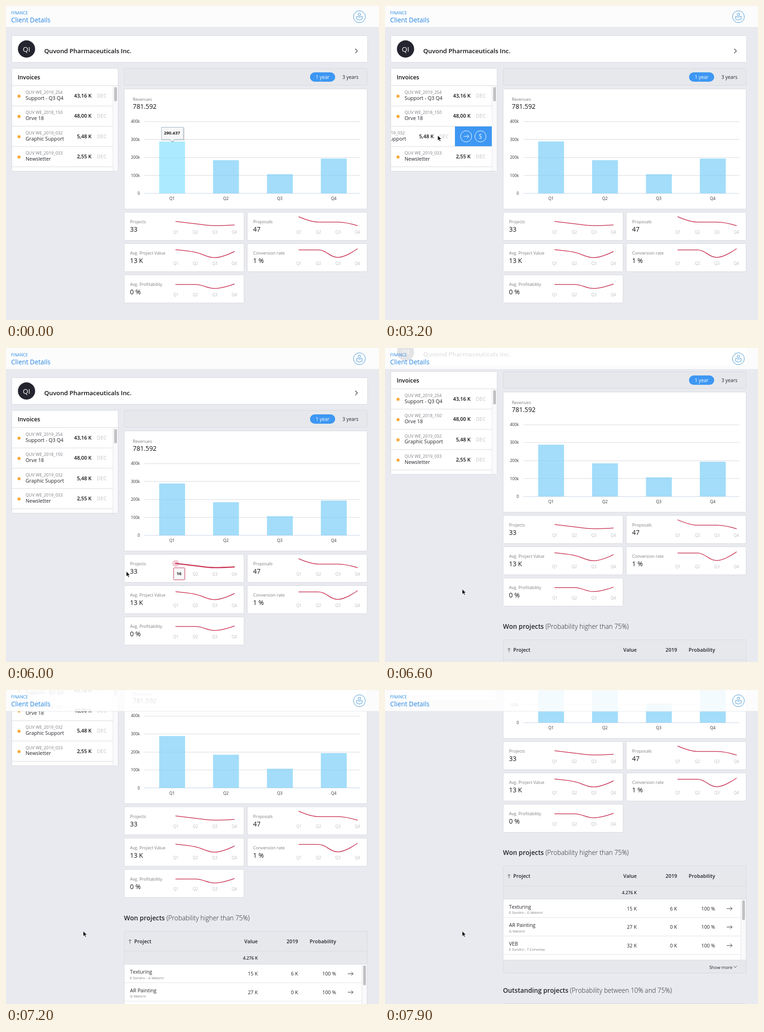
These frames come from a looping animation (800 px wide and 672 px high, 8 s). An HTML page:

```html
<!DOCTYPE html>
<html lang="en">
<head>
<meta charset="utf-8">
<title>Client Details</title>
<style>
html, body { margin: 0; width: 100%; height: 100%; overflow: hidden; background: #e8eaef; }
svg { display: block; width: 800px; height: 672px; font-family: "Open Sans", sans-serif; font-kerning: none; }
</style>
</head>
<body>
<svg id="stage" viewBox="0 0 800 672"></svg>
<script>
const LOOP = 8000, STEP = 100;
const INK = '#22242a', GREY = '#7b7d83', PALE = '#b9babf', LINE = '#d9dae0';
const BLUE = '#3d97f3', RED = '#cb3a5a', BAR = 'rgba(132,210,248,.75)', BAR_HOT = 'rgba(145,229,255,.75)';

// Markup helpers
const text = (x, y, s, size, fill = INK, more = '') =>
  `<text x="${x}" y="${y}" font-size="${size}" fill="${fill}" ${more}>${s}</text>`;
const rect = (x, y, w, h, fill, more = '') =>
  `<rect x="${x}" y="${y}" width="${w}" height="${h}" fill="${fill}" ${more}/>`;
const circle = (x, y, r, fill, more = '') =>
  `<circle cx="${x}" cy="${y}" r="${r}" fill="${fill}" ${more}/>`;
const path = (d, stroke, width = 1, more = '') =>
  `<path d="${d}" fill="none" stroke="${stroke}" stroke-width="${width}" ${more}/>`;
const hline = (x1, x2, y, stroke = LINE) => path(`M${x1} ${y}H${x2}`, stroke);
const card = (x, y, w, h, fill = '#fff') => rect(x, y, w, h, fill, `stroke="${LINE}" rx="2"`);
const arrow = (x, y, stroke) => path(`M${x - 6} ${y}h11.5m-4 -4l4 4l-4 4`, stroke);
const BOLD = 'font-weight="600" ', END = 'text-anchor="end" ', MID = 'text-anchor="middle" ';

function clientCard() {
  return card(12.5, 63.5, 763, 57) + circle(44, 92, 18.5, '#24252f') +
    text(44, 97.5, 'QI', 15, '#fff', MID) +
    text(82, 101, 'Quvond Pharmaceuticals Inc.', 13.3, '#111', BOLD) +
    path('M749 91.5l4.7 4.7l-4.7 4.7', '#333', 1.2);
}

const invoices = [
  ['2019_254', 'Support - Q3 Q4', '43,16 K'],
  ['2018_150', 'Orve 18', '48,00 K'],
  ['2019_032', 'Graphic Support', '5,48 K'],
  ['2019_033', 'Newsletter', '2,55 K']
];
const ROW = 43.4;

function invoiceList() {
  const rows = invoices.map(([code, name, sum], i) => {
    const y = i * ROW;
    return `<g id="row${i}">` + circle(28, 193 + y, 3.3, '#f8a93b') +
      text(42, 188 + y, 'QUV WE_' + code, 9.1, GREY) +
      text(42, 200.7 + y, name, 10.75) +
      text(183.5, 196 + y, sum, 10.9, '#111', BOLD + END) +
      text(195, 196 + y, 'DEC', 10.8, '#c3c4c8') +
      rect(229, 171 + y, 79, ROW - 1, BLUE) +
      circle(253, 192.2 + y, 12, 'none', 'stroke="#fff"') + arrow(253.5, 192.2 + y, '#fff') +
      circle(283.7, 192.2 + y, 12, 'none', 'stroke="#fff"') +
      text(283.7, 197.6 + y, '$', 15, '#fff', MID + 'font-weight="300"') +
      '</g>' + hline(13, 229, 170.5 + y + ROW);
  }).join('');
  return card(12.5, 133.5, 228, 220) + text(25, 157, 'Invoices', 12.3, '#111', BOLD) +
    `<clipPath id="list"><path d="M13 171H229V353H13z"/></clipPath><g clip-path="url(#list)">${rows}</g>` +
    rect(229, 171, 11, 182, '#fafafc') + path('M229.5 171V353', '#e6e7eb') +
    rect(232, 173.5, 6, 30.5, '#c1c1c4', 'rx="3"') + hline(13, 240, 170.5);
}

function revenues() {
  const tops = [290, 330, 360, 326.5];
  let s = card(253.5, 133.5, 521, 36, '#e6e8ec') +
    rect(652, 142, 54, 20, BLUE, 'rx="10"') +
    text(679, 156, '1 year', 10.3, '#fff', MID) + text(721.5, 156, '3 years', 10.3) +
    card(253.5, 177.5, 521, 257) +
    text(272, 203, 'Revenues', 9.1, GREY) + text(272, 219.7, '781.592', 13.8, '#111');
  for (let i = 0; i < 5; i++) {
    const y = 401 - i * 38.6;
    s += hline(297, 760, Math.round(y) + (i ? .5 : 0), i ? '#d8d9dd' : '#c5d0e6') +
      text(287, y + 3.3, i ? i + '00k' : '0', 8.5, '#333', END);
  }
  tops.forEach((top, i) => {
    const x = 328.5 + i * 115.6;
    s += rect(x, top, 55.5, 401 - top, BAR, `id="bar${i}"`) +
      text(x + 27.5, 415, 'Q' + (i + 1), 8.7, '#333', MID);
  });
  return s + '<g id="tip">' +
    path('M334 260.5h46.5v25h-20l-4 4.5l-4-4.5h-18.5z', '#000', 3, 'opacity=".12" transform="translate(1 1)"') +
    '<path d="M333.5 259.5h47v26h-20l-4 4.5l-4-4.5h-19z" fill="#f7f7f8" stroke="#9fb4c2"/>' +
    text(356, 274.5, '290.437', 9.3, '#222', MID + 'font-weight="700"') + '</g>';
}

const clamp = (v, a, b) => Math.max(Math.min(a, b), Math.min(Math.max(a, b), v));
const GAP = 41.9;

// Spline through four quarters whose handles never overshoot the neighbours
function spline(x, ys) {
  let d = `M${x} ${ys[0]}`, out = ys[0];
  for (let i = 1; i < 4; i++) {
    const y = ys[i], next = ys[i + 1];
    let left = y, right = y;
    if (i < 3) {
      left = clamp(y - (next - ys[i - 1]) * .2, ys[i - 1], y);
      right = clamp(2 * y - left, y, next);
      left = 2 * y - right;
    }
    const px = x + (i - 1) * GAP, nx = x + i * GAP;
    d += `C${i > 1 ? px + GAP * .4 : px} ${out} ${i < 3 ? nx - GAP * .4 : nx} ${left} ${nx} ${y}`;
    out = right;
  }
  return d;
}

const projectYs = [461, 466, 470, 468.5], projectCounts = [16, 8, 4, 5];
const metrics = [
  ['Projects', '33', projectYs],
  ['Proposals', '47', [451, 462.5, 462.5, 470]],
  ['Avg. Project Value', '13 K', [521.5, 527, 538.5, 525.5]],
  ['Conversion rate', '1 %', [522, 522, 538, 519.5]],
  ['Avg. Profitability', '0 %', [596, 596, 604.5, 595]]
];

function metricCards() {
  const cards = metrics.map(([label, value, ys], i) => {
    const x = 253.5 + i % 2 * 264, y = 441.5 + (i >> 1) * 67;
    return card(x, y, 257, 60) + text(x + 12.5, y + 23.5, label, 9.15, GREY) +
      text(x + 12.5, y + 41.5, value, 13.8, '#111') +
      [0, 1, 2, 3].map(q => text(x + 111 + q * 41.7, y + 45.3, 'Q' + (q + 1), 8.4, PALE, MID)).join('') +
      path(spline(x + 110.5, ys), RED, 1.5, `id="line${i}" stroke-linecap="round"`);
  }).join('');
  return cards + '<g id="spark">' + circle(0, 0, 7.5, RED, 'id="halo" opacity=".25"') +
    '<g id="sparkTip">' + rect(1, 1.5, 24, 25, '#000', 'opacity=".12" rx="2"') +
    rect(0, 0, 24, 25.5, '#f7f7f8', `stroke="${RED}" rx="1.5"`) +
    text(11.5, 15, '', 9.3, '#222', 'id="count" font-weight="700" ' + MID) + '</g></g>';
}

function heading(y, title, note) {
  return text(253, y, `<tspan ${BOLD}>${title}</tspan> (${note})`, 13.8, INK, 'font-weight="300"');
}

const projects = [
  ['Texturing', 'E Sundro - G Malorvi', '15 K', '6 K'],
  ['AR Painting', 'G Malorvi', '27 K', '0 K'],
  ['VEB', 'E Sundro - T Corvessa', '32 K', '0 K']
];

function tables() {
  let s = heading(684, 'Won projects', 'Probability higher than 75%') +
    card(253.5, 707.5, 521, 229, '#e6e8ec') + rect(254, 778.5, 520, 130.5, '#fff') +
    path('M266 734v-8.5m-3 3l3-3l3 3', '#555') + text(275, 733, 'Project', 10.8, INK, BOLD);
  [['Value', 540], ['2019', 626.5], ['Probability', 708]].forEach(([h, x]) =>
    s += text(x, 733, h, 10.8, INK, BOLD + END));
  s += hline(254, 774, 750.5) + text(540, 768, '4.276 K', 9.2, INK, BOLD + END) + hline(254, 774, 778.5);
  projects.forEach(([name, team, value, year], i) => {
    const y = i * 39.5;
    s += text(266, 798.5 + y, name, 10.7) + text(266, 810 + y, team, 7.6, GREY) +
      [[value, 540], [year, 626.5], ['100 %', 708]].map(([v, x]) => text(x, 802.5 + y, v, 10.5, INK, END)).join('') +
      arrow(739, 798.8 + y, '#333') + hline(254, 764, 818 + y, '#e2e3e7');
  });
  return s + rect(763.5, 779, 10.5, 130, '#fafafc') + path('M763.5 779V909', '#e2e3e7') +
    rect(766, 781, 6, 42.5, '#c1c1c4', 'rx="3"') + hline(254, 774, 909) +
    text(695.5, 927.5, 'Show more', 9.3) + path('M747.5 921.5l3.5 3.5l3.5-3.5', '#444') +
    heading(979, 'Outstanding projects', 'Probability between 10% and 75%') +
    card(253.5, 1002, 521, 60, '#e6e8ec');
}

function header() {
  return rect(0, 0, 800, 45.5, '#fff', 'opacity=".88"') + hline(0, 800, 45.5, '#e8e9ee') +
    text(11, 17.5, 'FINANCE', 8.7, '#2b8ae0') + text(11, 35, 'Client Details', 13.8, '#2283df') +
    circle(758, 23, 12.7, 'none', 'stroke="#4a9ad6"') + circle(758, 18.2, 2.8, 'none', 'stroke="#4a9ad6"') +
    path('M752 22l6 2l6-2v6l-6 2.2l-6-2.2z', '#4a9ad6');
}

const stage = document.getElementById('stage');
stage.innerHTML = rect(0, 0, 800, 672, '#e8eaef') +
  `<g id="page">${clientCard()}${invoiceList()}${revenues()}${metricCards()}${tables()}</g>` + header() +
  '<path id="cursor" d="M0 0v11.2l2.6-2.4l1.8 4l2-.9l-1.8-3.8h3.6z" fill="#111" stroke="#fff" stroke-width=".8"/>';
const $ = id => document.getElementById(id);
const set = (id, name, value) => $(id).setAttribute(name, value);
const move = (id, x, y) => set(id, 'transform', `translate(${x} ${y})`);

// Motion: [time, value, ...] keys, linear between them
const cursorKeys = [
  [300, 350, 330], [700, 330, 320], [1000, 60, 252], [1100, 44, 249], [1200, 35, 249], [1400, 2, 248],
  [1700, 3, 249], [2000, 60, 262], [2600, 192, 277], [2800, 192, 277], [3200, 113, 277], [3500, 113, 277],
  [4000, 250, 440], [4400, 395, 470], [5000, 450, 472], [5500, 372, 474], [5900, 290, 477],
  [6000, 258, 478], [6300, 165.5, 516]
];
const swipes = {
  row1: [[1100, 0], [1200, 9], [1400, 42], [1600, 79], [2300, 79], [2500, 0]],
  row2: [[2800, 0], [3200, 79], [3450, 79], [3700, 0]]
};

function at(keys, t) {
  const i = keys.findIndex(k => k[0] > t);
  if (i < 0) return keys[keys.length - 1].slice(1);
  if (!i) return keys[0].slice(1);
  const a = keys[i - 1], b = keys[i], p = (t - a[0]) / (b[0] - a[0]);
  return a.slice(1).map((v, j) => v + (b[j + 1] - v) * p);
}
const fade = (t, start) => clamp(1 - (t - start) / 200, 0, 1);
const flick = (t, start) => 1 - (1 - clamp((t - start) / 800, 0, 1)) ** 1.98;

function draw(t) {
  const [x, y] = at(cursorKeys, t);
  move('cursor', x, y);
  set('cursor', 'opacity', t < 300 ? 0 : 1);
  move('page', 0, -(191.5 * flick(t, 6400) + 141.8 * flick(t, 7200)));
  for (const id in swipes) move(id, -at(swipes[id], t)[0], 0);
  set('bar0', 'fill', t < 800 ? BAR_HOT : BAR);
  set('tip', 'opacity', fade(t, 1300));

  const hover = t >= 4300 ? fade(t, 6200) : 0;
  const q = clamp(Math.round((x - 364) / GAP), 0, 3), px = 364 + q * GAP;
  set('spark', 'opacity', hover);
  set('line0', 'stroke-width', hover ? 2.4 : 1.5);
  move('halo', px, projectYs[q]);
  move('sparkTip', Math.max(359.5, px - 12), projectYs[q] + 9.5);
  $('count').textContent = projectCounts[q];
}

const begin = performance.now();
function tick() {
  const t = (performance.now() - begin) % LOOP;
  draw(Math.floor(t / STEP) * STEP);
  requestAnimationFrame(tick);
}
tick();
</script>
</body>
</html>
```
